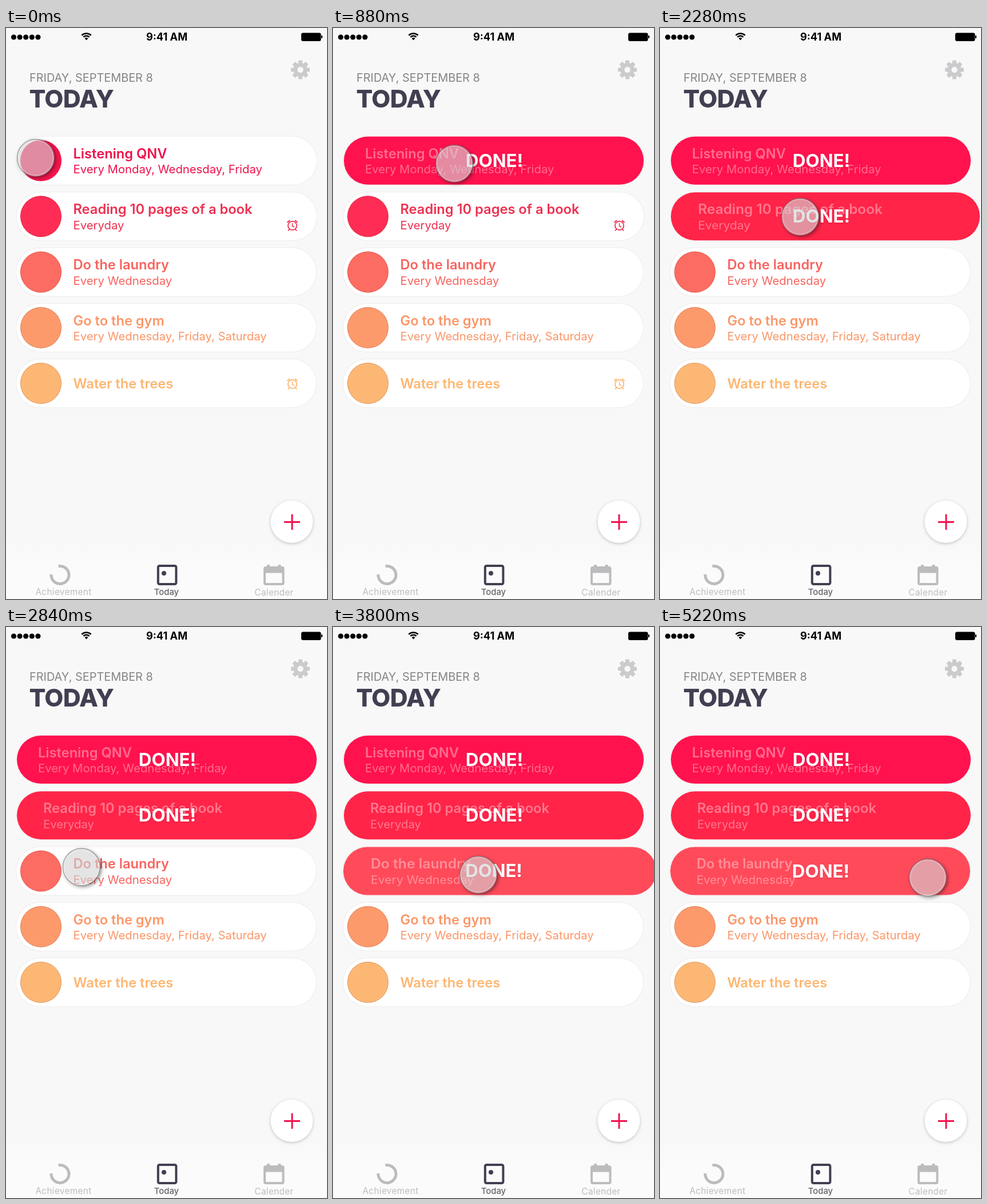
Recreate the animation shown at these times as an HTML page with a canvas. Size 561 by 998 pixels, loop 5.24 s.

```html
<!DOCTYPE html>
<html lang="en">
<head>
<meta charset="utf-8">
<title>Habit list</title>
<style>
html, body { margin: 0; width: 100%; height: 100%; overflow: hidden; background: #f8f8f8; }
canvas { display: block; width: 561px; height: 998px; }
</style>
</head>
<body>
<canvas id="stage" width="561" height="998"></canvas>
<script>
const ctx = document.getElementById('stage').getContext('2d');
const LOOP = 5240, TAU = Math.PI * 2;
const GREY = '#bcbcbe', DARK = '#413f51', PINK = '#f2114d';

// A row with a swipe: drag from start to release, snap out to peak, then settle.
const rows = [
  { x: 19, y: 189.7, title: 'Listening QNV', sub: 'Every Monday, Wednesday, Friday',
    dot: [246, 20, 76], full: [255, 18, 77], ink: '#ee124d', inset: 38,
    start: 0, release: 455, peak: 540 },
  { x: 19, y: 287.2, title: 'Reading 10 pages of a book', sub: 'Everyday', alarm: 345,
    dot: [255, 45, 85], full: [255, 36, 72], ink: '#ee3150', inset: 47,
    start: 1820, release: 2030, peak: 2120 },
  { x: 18, y: 384.5, title: 'Do the laundry', sub: 'Every Wednesday',
    dot: [252, 108, 98], full: [255, 74, 90], ink: '#f7645f', inset: 47,
    start: 3440, release: 3600, peak: 3680 },
  { x: 18, y: 481.8, title: 'Go to the gym', sub: 'Every Wednesday, Friday, Saturday',
    dot: [253, 154, 108], ink: '#fb9769' },
  { x: 18, y: 579, title: 'Water the trees', alarm: 622,
    dot: [253, 183, 116], ink: '#fdb671' }
];
const CARD_W = 524, CARD_H = 84, OVERSHOOT = 36;

// Pointer moves: begin, end, then the point reached.
const home = [52, 227];
const moves = [
  [0, 460, 212, 237], [1120, 1620, 53, 328], [1820, 2120, 245, 330],
  [2360, 2880, 130, 421], [2900, 3260, 64, 427], [3440, 3680, 254, 433],
  [4720, 5220, 468, 438]
];

const clamp = v => Math.max(0, Math.min(1, v));
const span = (t, a, b) => clamp((t - a) / (b - a));
const smooth = p => p * p * (3 - 2 * p);
const out = p => 1 - (1 - p) ** 3;
const mix = (a, b, p) => a + (b - a) * p;
const rgb = c => `rgb(${c.map(Math.round).join()})`;

function text(str, x, y, size, weight, color, align = 'left', spacing = 0) {
  ctx.font = `${weight} ${size}px Inter, sans-serif`;
  ctx.textAlign = align;
  ctx.letterSpacing = spacing + 'px';
  ctx.fillStyle = color;
  ctx.fillText(str, x, y);
}

function disc(x, y, r, color) {
  ctx.beginPath();
  ctx.arc(x, y, r, 0, TAU);
  ctx.fillStyle = color;
  ctx.fill();
}

function box(x, y, w, h, r, color) {
  ctx.beginPath();
  ctx.roundRect(x, y, w, h, r);
  ctx.fillStyle = color;
  ctx.fill();
}

function line(color, width, ...points) {
  ctx.beginPath();
  points.forEach(([x, y], i) => i ? ctx.lineTo(x, y) : ctx.moveTo(x, y));
  ctx.strokeStyle = color;
  ctx.lineWidth = width;
  ctx.stroke();
}

function arc(x, y, r, a, b, color, width) {
  ctx.beginPath();
  ctx.arc(x, y, r, a, b);
  ctx.strokeStyle = color;
  ctx.lineWidth = width;
  ctx.stroke();
}

function statusBar() {
  for (let i = 0; i < 5; i++) disc(13.5 + i * 10.6, 16, 4.6, '#000');
  const a = -Math.PI * .75, b = -Math.PI * .25;
  arc(140.5, 21, 11.5, a, b, '#000', 2.6);
  arc(140.5, 21, 7.2, a, b, '#000', 2.6);
  ctx.beginPath();
  ctx.moveTo(140.5, 21.5);
  ctx.arc(140.5, 21, 4, a, b);
  ctx.fillStyle = '#000';
  ctx.fill();
  text('9:41 AM', 281, 21.5, 18.2, 700, '#000', 'center');
  box(516, 8.5, 34.5, 14.5, 3, '#000');
  box(551, 13, 2, 5, 1, '#000');
}

function gear(x, y) {
  ctx.save();
  ctx.translate(x, y);
  for (let i = 0; i < 8; i++) {
    box(-3.6, -16.5, 7.2, 8, 1.5, '#cbcbcd');
    ctx.rotate(TAU / 8);
  }
  ctx.restore();
  disc(x, y, 12.2, '#cbcbcd');
  disc(x, y, 5.2, '#f8f8f8');
}

function header() {
  gear(514.5, 73);
  text('FRIDAY, SEPTEMBER 8', 41, 93.5, 19.9, 400, '#858587');
  text('TODAY', 40.5, 139, 42.8, 800, DARK, 'left', -.7);
}

function addButton() {
  ctx.save();
  ctx.shadowColor = 'rgba(0,0,0,.22)';
  ctx.shadowBlur = 5;
  ctx.shadowOffsetY = 1.5;
  disc(499.5, 863, 37, '#fff');
  ctx.restore();
  line(PINK, 3, [486, 863.5], [514, 863.5]);
  line(PINK, 3, [500, 850], [500, 877]);
}

function tabs() {
  arc(94.5, 956, 15.5, -Math.PI * .56, Math.PI * 1.02, GREY, 5);
  text('Achievement', 100.5, 991, 15.4, 400, '#bdbdbf', 'center', .3);

  ctx.beginPath();
  ctx.roundRect(265.8, 940, 31.6, 32, 2.5);
  ctx.strokeStyle = DARK;
  ctx.lineWidth = 4;
  ctx.stroke();
  disc(276, 953, 4, DARK);
  text('Today', 280.5, 990.5, 14.8, 500, '#646369', 'center');

  box(450, 941, 36.5, 33, 4, GREY);
  box(456, 938, 5, 8, 1, GREY);
  box(475.5, 938, 5, 8, 1, GREY);
  box(454, 952.5, 28.5, 17.5, 1, '#fbfbfb');
  text('Calender', 468.5, 992, 15.4, 400, '#bdbdbf', 'center', .3);
}

function alarm(x, y, color) {
  arc(x, y + .5, 7.6, 0, TAU, color, 1.8);
  line(color, 1.5, [x, y - 4], [x, y + 1], [x + 3.5, y + 3]);
  for (const s of [-1, 1]) {
    line(color, 2, [x + s * 4.5, y - 9], [x + s * 9, y - 5]);
    line(color, 1.8, [x + s * 5, y + 6.5], [x + s * 7.5, y + 9.5]);
  }
}

function labels(row, x, title, sub) {
  text(row.title, x, row.y + (row.sub ? 37.8 : 51.3), 23.65, 600, title);
  if (row.sub) text(row.sub, x, row.y + 64.6, 20.3, 400, sub);
}

function card(row, t) {
  ctx.beginPath();
  ctx.roundRect(row.x, row.y, CARD_W, CARD_H, CARD_H / 2);
  ctx.strokeStyle = '#efefef';
  ctx.lineWidth = 2.5;
  ctx.stroke();
  ctx.fillStyle = '#fff';
  ctx.fill();
  labels(row, 117.5, row.ink, row.ink);
  if (row.alarm && t < 2000) alarm(500.5, row.alarm, row.ink);
  if (row.start === undefined || t <= row.start) {
    const cy = row.y + CARD_H / 2;
    disc(61, cy, 36, rgb(row.dot));
    arc(61, cy, 35.5, 0, TAU, 'rgba(110,50,30,.22)', 1);
  } else {
    swipe(row, t);
  }
}

function swipe(row, t) {
  const drag = smooth(span(t, row.start, row.release));
  const snap = Math.sin(span(t, row.release, row.peak) * Math.PI / 2);
  const settle = smooth(span(t, row.peak, row.peak + 300));
  const grow = clamp(drag * 3);

  const left = mix(25, row.x, grow);
  const height = mix(72, CARD_H, grow);
  const held = mix(97, row.x + 280, drag);
  const right = mix(held, row.x + CARD_W + OVERSHOOT, snap) - OVERSHOOT * settle;
  const color = row.dot.map((c, i) => mix(c, row.full[i], drag));
  box(left, row.y + (CARD_H - height) / 2, right - left, height, height / 2, rgb(color));

  ctx.save();
  ctx.globalAlpha = .38 * drag;
  ctx.translate(left, 0);
  ctx.scale((right - left) / CARD_W, 1);
  labels(row, row.inset - 1, '#fff', '#fff');
  ctx.restore();

  const pop = out(span(t, row.peak - 120, row.peak + 200));
  if (!pop) return;
  ctx.save();
  ctx.globalAlpha = Math.min(1, pop + .15);
  ctx.translate(row.x + 263, row.y + CARD_H / 2);
  ctx.scale(mix(.45, 1, pop), mix(.45, 1, pop));
  ctx.shadowColor = 'rgba(120,0,30,.25)';
  ctx.shadowBlur = 3;
  ctx.shadowOffsetY = 1;
  text('DONE!', 0, 11, 31.4, 700, '#fff', 'center');
  ctx.restore();
}

function pointerAt(t) {
  let [x, y] = home;
  for (const [a, b, toX, toY] of moves) {
    const p = smooth(span(t, a, b));
    x = mix(x, toX, p);
    y = mix(y, toY, p);
  }
  return [x, y];
}

function pointer(t) {
  const [x, y] = pointerAt(t);
  // Shadow only outside the translucent disc.
  ctx.save();
  ctx.beginPath();
  ctx.rect(0, 0, 561, 998);
  ctx.arc(x, y, 32.5, 0, TAU);
  ctx.clip('evenodd');
  ctx.shadowColor = 'rgba(0,0,0,.5)';
  ctx.shadowBlur = 7;
  ctx.shadowOffsetX = 2.5;
  ctx.shadowOffsetY = 2.5;
  disc(x, y, 32, '#999');
  ctx.restore();
  disc(x, y, 32, 'rgba(211,212,214,.62)');
  arc(x, y, 32.4, 0, TAU, 'rgba(120,114,114,.6)', 1.6);
  arc(x, y, 30.7, 0, TAU, 'rgba(255,255,255,.25)', 1.8);
}

function draw(t) {
  const bg = ctx.createLinearGradient(0, 890, 0, 950);
  bg.addColorStop(0, '#f8f8f8');
  bg.addColorStop(1, '#fbfbfb');
  ctx.fillStyle = bg;
  ctx.fillRect(0, 0, 561, 998);
  statusBar();
  header();
  rows.forEach(row => card(row, t));
  addButton();
  tabs();
  pointer(t);
}

const begin = performance.now();
function tick() {
  draw((performance.now() - begin) % LOOP);
  requestAnimationFrame(tick);
}
tick();
</script>
</body>
</html>
```
